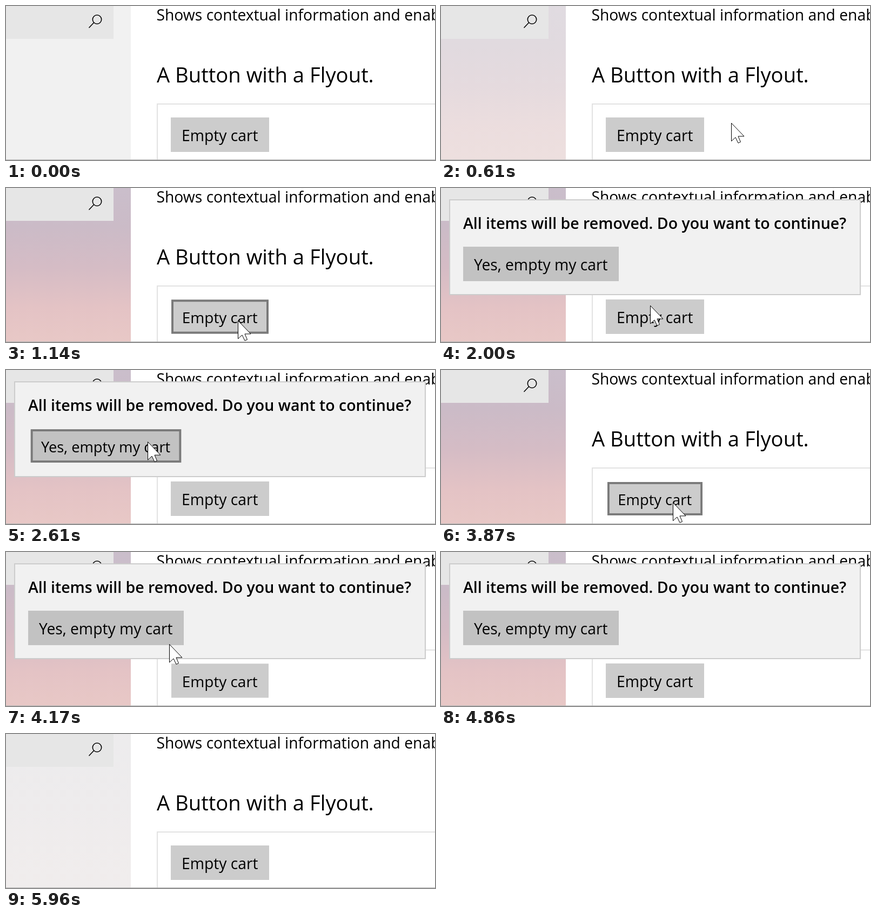
Recreate the animation shown at these times as an HTML page. Size 794x286 px, loop 6330 ms.

```html
<!DOCTYPE html>
<html lang="en">
<head>
<meta charset="utf-8">
<title>Button with a flyout</title>
<style>
  html, body { margin: 0; width: 100%; height: 100%; overflow: hidden; background: #fff; }
  svg { display: block; width: 794px; height: 286px; }
  text { font: 28.25px "Open Sans", "Noto Sans", sans-serif; white-space: pre; }
  text.title { font-size: 38.2px; }
  text.strong { font-size: 28.47px; font-weight: 600; }
  .ring { fill: none; stroke: #7a7a7a; stroke-width: 4; }
</style>
</head>
<body>
<svg viewBox="0 0 794 286">
  <defs>
    <linearGradient id="dusk" x2="0" y2="1">
      <stop offset="0" stop-color="#cabecb"/>
      <stop offset=".25" stop-color="#cbbbc7"/>
      <stop offset=".52" stop-color="#d5bcc5"/>
      <stop offset=".78" stop-color="#e4c3c5"/>
      <stop offset="1" stop-color="#e8c8c6"/>
    </linearGradient>
  </defs>

  <rect width="794" height="286" fill="#fff"/>
  <rect width="231" height="286" fill="#f1f1f1"/>
  <rect id="tint" width="231" height="286" fill="url(#dusk)"/>
  <rect width="199" height="61" fill="#e6e6e6"/>
  <g fill="none" stroke="#000" stroke-width="1.6">
    <circle cx="168.5" cy="25" r="8.2"/>
    <path d="M162.5 31 153.5 40.5"/>
  </g>

  <text x="278.5" y="26.5">Shows contextual information and enable interaction</text>
  <text class="title" x="279" y="142">A Button with a Flyout.</text>
  <path d="M280 290V182H800" fill="none" stroke="#e2e2e2" stroke-width="2"/>

  <g id="cart">
    <rect x="305" y="207" width="182" height="64" fill="#ccc"/>
    <rect class="ring" x="307" y="209" width="178" height="60"/>
    <text x="325" y="251">Empty cart</text>
  </g>
  <rect y="285" width="794" height="1" fill="#b4b4b4"/>

  <g id="flyout">
    <rect x="16" y="22" width="760" height="176" fill="#f1f1f1" stroke="#ccc" stroke-width="2"/>
    <text class="strong" x="41" y="76">All items will be removed. Do you want to continue?</text>
    <g id="yes">
      <rect x="41" y="109" width="288" height="64" fill="#c2c2c2"/>
      <rect class="ring" x="43" y="111" width="284" height="60"/>
      <text x="61" y="153">Yes, empty my cart</text>
    </g>
  </g>

  <path id="pointer" d="M.5 .5V34L8 27 13 37.5 17.5 35.5 13 25H24Z" fill="#fff" stroke="#000"/>
</svg>

<script>
const LOOP = 6330, TICK = 75;
const [tint, cart, flyout, yes, pointer] =
  ["tint", "cart", "flyout", "yes", "pointer"].map(id => document.getElementById(id));

// Each round: the cart button is pressed, later the flyout closes
const rounds = [{ press: 1070, close: 2770 }, { press: 3700, close: 5870 }];

const moves = [
  { from: 140, to: 290, x: 618, y: 195 },
  { from: 450, to: 900, x: 429, y: 246 },
  { from: 2000, to: 2230, x: 262, y: 133 },
  { from: 3310, to: 3310, x: 275, y: 150 },
  { from: 3390, to: 3550, x: 429, y: 246 },
  { from: 4010, to: 4170, x: 302, y: 171 },
  { from: 4560, to: 4860, x: 671, y: 290 },
  { from: 5490, to: 5490, x: 786, y: 164 },
  { from: 5560, to: 5640, x: 790, y: 290 }
];

// Rises from 0 to 1 in even jumps, the first at a and the last at b
function ramp(t, a, b) {
  if (t < a) return 0;
  if (t >= b) return 1;
  const gaps = Math.round((b - a) / TICK);
  return (Math.floor((t - a) / (b - a) * gaps) + 1) / (gaps + 1);
}

const overRounds = f => rounds.reduce((sum, r) => sum + f(r), 0);

function pointerAt(t) {
  let x = 640, y = 290;
  for (const m of moves) {
    const p = ramp(t, m.from, m.to);
    x += (m.x - x) * p;
    y += (m.y - y) * p;
  }
  return [Math.round(x), Math.round(y)];
}

// True when the point lies inside the button's ring
function hit(button, [x, y]) {
  const b = button.querySelector(".ring").getBBox();
  return x > b.x && x < b.x + b.width && y > b.y && y < b.y + b.height - 2;
}

function showButton(el, press, hover) {
  const b = el.querySelector("rect").getBBox();
  const cx = b.x + b.width / 2, cy = b.y + b.height / 2, s = 1 - 0.033 * press;
  el.setAttribute("transform", `translate(${cx} ${cy}) scale(${s}) translate(${-cx} ${-cy})`);
  el.querySelector(".ring").style.visibility = hover ? "visible" : "hidden";
}

function draw(t) {
  const at = pointerAt(t);
  const open = overRounds(r => ramp(t, r.press + 230, r.press + 460) - ramp(t, r.close, r.close + 90));
  const press = overRounds(r => ramp(t, r.press, r.press + 150) - ramp(t, r.press + 230, r.press + 630));
  const overYes = open > 0 && hit(yes, at);

  tint.style.opacity = ramp(t, 450, 900) - 0.9 * ramp(t, 5870, 5960);
  flyout.style.opacity = open;
  flyout.style.display = open > 0 ? "" : "none";
  showButton(cart, press, open <= 0 && hit(cart, at));
  if (open > 0) showButton(yes, overYes ? ramp(t, 2540, 2610) : 0, overYes);
  pointer.setAttribute("transform", `translate(${at})`);
}

const start = performance.now();
function tick() {
  draw((performance.now() - start) % LOOP);
  requestAnimationFrame(tick);
}
tick();
</script>
</body>
</html>
```
